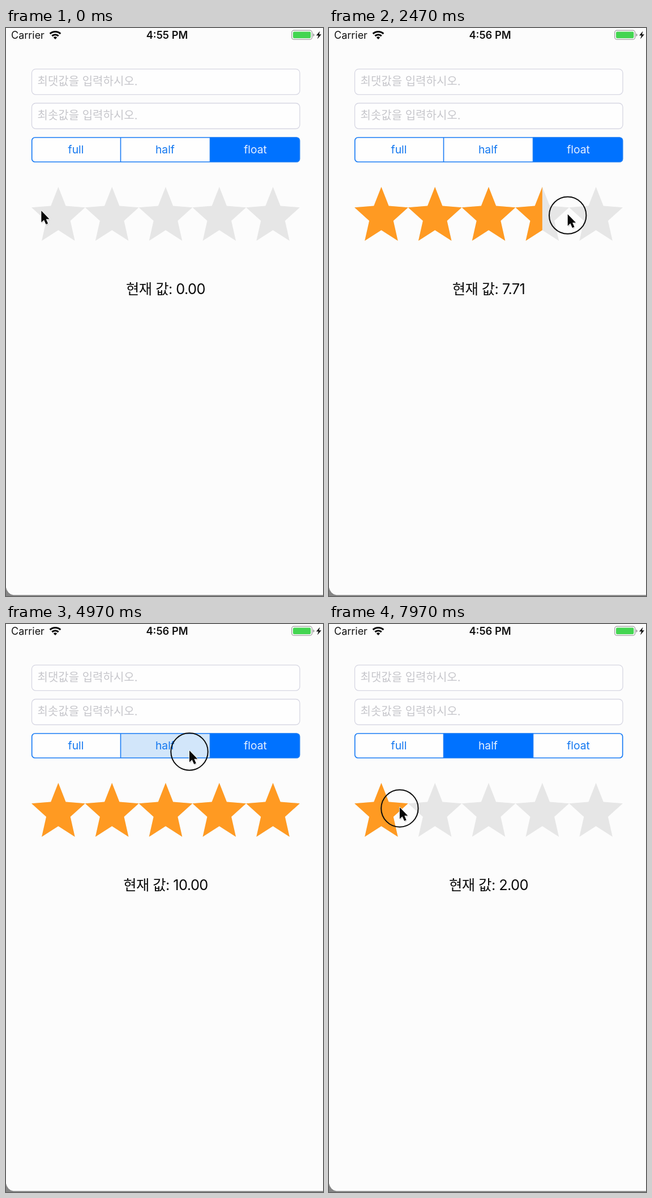
Recreate the animation shown at these times as an HTML page. Size 560 by 1001 pixels, loop 8 s.

```html
<!DOCTYPE html>
<html lang="ko">
<head>
<meta charset="utf-8">
<title>Star rating</title>
<style>
  html, body { margin: 0; width: 100%; height: 100%; overflow: hidden; background: #858585; }
  svg { display: block; width: 560px; height: 1001px; }
  text { font-family: Inter, "Noto Sans CJK KR", "Noto Sans CJK", sans-serif; }
  .status { font-size: 18px; fill: #111; }
  .hint { font-size: 20px; fill: #c6c6cb; }
  .field { fill: #fefefe; stroke: #d6d6e2; stroke-width: 1.3; }
  .seg { font-size: 19.3px; text-anchor: middle; fill: #1478f0; }
  .seg.on { fill: #e4f0ff; }
  .value { font-size: 25.4px; letter-spacing: -.6px; text-anchor: middle; fill: #0c0c0c; }
</style>
</head>
<body>
<svg viewBox="0 0 560 1001">
  <defs>
    <g id="stars"></g>
    <clipPath id="fillClip"><rect id="fill" x="40" y="270" width="0" height="115"/></clipPath>
    <clipPath id="segClip"><rect x="45" y="192.5" width="474" height="43.5" rx="6"/></clipPath>
  </defs>
  <path d="M0 0H560V999.3H13Q3 998 0 986Z" fill="#fcfcfc"/>

  <text class="status" x="9" y="19">Carrier</text>
  <g fill="none" stroke="#0a0a0a" stroke-width="3.1">
    <path d="M77.7 10.2A13.5 13.5 0 0 1 96.3 10.2"/>
    <path d="M81.3 14A8.4 8.4 0 0 1 92.7 14"/>
    <path d="M87 20L83.8 16.7A4.8 4.8 0 0 1 90.2 16.7Z" fill="#0a0a0a" stroke="none"/>
  </g>
  <text id="clock" class="status" x="284.5" y="19" text-anchor="middle" style="font-weight:600;font-size:18.3px"></text>
  <rect x="504.7" y="4.2" width="36" height="16" rx="4" fill="none" stroke="#a0a0a0" stroke-width="1.3"/>
  <rect x="507" y="6.5" width="31.4" height="11.4" rx="2" fill="#43d551"/>
  <path d="M542.3 9.5Q544.8 10.2 544.8 12.2T542.3 15Z" fill="#a0a0a0"/>
  <path d="M554.5 5.5L548 13.3H552L550 19.5L557 11.2H553Z" fill="#111"/>

  <rect class="field" x="45.5" y="72.3" width="473.5" height="45" rx="7"/>
  <rect class="field" x="45.5" y="132.5" width="473.5" height="45" rx="7"/>
  <text class="hint" x="55.5" y="101">최댓값을 입력하시오.</text>
  <text class="hint" x="55.5" y="161">최솟값을 입력하시오.</text>

  <g clip-path="url(#segClip)">
    <rect x="45" y="192" width="474" height="45" fill="#fefefe"/>
    <rect id="press" x="202.5" y="192" width="158" height="45" fill="#d2e6fa"/>
    <rect id="chosen" y="192" height="45" width="159" fill="#0072ff"/>
  </g>
  <path d="M202.5 193V236M360.5 193V236" stroke="#1a7cf5" stroke-width="1.6"/>
  <rect x="45.7" y="193" width="473" height="43" rx="5.5" fill="none" stroke="#1a7cf5" stroke-width="1.7"/>
  <text class="seg" x="123.5" y="221">full</text>
  <text class="seg" id="half" x="281" y="221">half</text>
  <text class="seg" id="float" x="440.5" y="221">float</text>

  <use href="#stars" fill="#e6e6e6"/>
  <use href="#stars" fill="#ff9a22" clip-path="url(#fillClip)"/>
  <text id="value" class="value" x="282" y="469"></text>

  <g id="pointer">
    <circle id="touch" cy="2" r="32.7" fill="none" stroke="#0d0d0d" stroke-width="2"/>
    <g stroke-linejoin="round">
      <path id="shade" d="M0 0V20.5L4.7 16.2L8.2 24L11.8 22.4L8.4 14.8H14.3Z" transform="translate(1 2)" fill="#000" opacity=".16"/>
      <use href="#shade" x="-1" y="-2" visibility="hidden"/>
      <path d="M0 0V20.5L4.7 16.2L8.2 24L11.8 22.4L8.4 14.8H14.3Z" fill="#080808" stroke="#fff" stroke-width="1.6" paint-order="stroke"/>
    </g>
  </g>
</svg>
<script>
const $ = id => document.getElementById(id);
const LOOP = 8000, LEFT = 45, PITCH = 94.8;

// Pointer: time, x, y, and 1 where the way to the next key is eased
const PATH = [
  [0, 62, 322], [30, 73, 323], [200, 75, 323], [1700, 309, 326],
  [3130, 518, 330], [3300, 532, 330], [3850, 532, 330, 1], [4370, 510, 316, 1],
  [4880, 324, 223], [5090, 324, 223, 1], [5470, 520, 318], [5510, 520, 318],
  [6130, 414, 321], [6870, 290, 318], [7970, 125, 323], [8000, 121, 323]
];
const DRAG = [[200, .59], [1700, 5.41], [3130, 9.68], [3240, 10]];
const TOUCHES = [[30, 3800], [4900, 5050], [5500, LOOP]];
const SWITCH = 5050;

function sample(keys, t, col) {
  let i = 0;
  while (i < keys.length - 2 && t >= keys[i + 1][0]) i++;
  const a = keys[i], b = keys[i + 1];
  let p = Math.min(1, Math.max(0, (t - a[0]) / (b[0] - a[0])));
  if (a[3]) p = p * p * (3 - 2 * p);
  return a[col] + (b[col] - a[col]) * p;
}

function starPath(cx) {
  const pts = Array.from({ length: 10 }, (_, i) => {
    const r = i % 2 ? .45 : 1, a = i * Math.PI / 5;
    return (cx + 49.8 * r * Math.sin(a)).toFixed(2) + ' ' + (332.5 - 52.5 * r * Math.cos(a)).toFixed(2);
  });
  return 'M' + pts.join('L') + 'Z';
}

const stars = document.createElementNS('http://www.w3.org/2000/svg', 'path');
stars.setAttribute('d', [0, 1, 2, 3, 4].map(i => starPath(LEFT + PITCH * (i + .5))).join(''));
$('stars').append(stars);

function rating(t, x) {
  if (t < 230) return 0;
  if (t < 5500) return sample(DRAG, t, 1);
  return Math.min(10, Math.max(0, Math.round((x - LEFT) / PITCH * 2)));
}

const show = (id, on) => $(id).setAttribute('visibility', on ? 'visible' : 'hidden');
const setText = (id, s) => { if ($(id).textContent !== s) $(id).textContent = s; };

function draw(t) {
  const x = sample(PATH, t, 1), y = sample(PATH, t, 2);
  const v = rating(t, x), half = t >= SWITCH;

  $('pointer').setAttribute('transform', `translate(${x} ${y})`);
  show('touch', TOUCHES.some(([from, to]) => t >= from && t < to));
  show('press', t >= 4900 && t < SWITCH);
  $('chosen').setAttribute('x', half ? 202 : 360);
  $('half').classList.toggle('on', half);
  $('float').classList.toggle('on', !half);

  $('fill').setAttribute('width', LEFT - 40 + Math.floor(v) * PITCH / 2);
  setText('value', '현재 값: ' + v.toFixed(2));
  setText('clock', t < 30 ? '4:55 PM' : '4:56 PM');
}

const start = performance.now();
function tick() {
  draw((performance.now() - start) % LOOP);
  requestAnimationFrame(tick);
}
tick();
</script>
</body>
</html>
```
